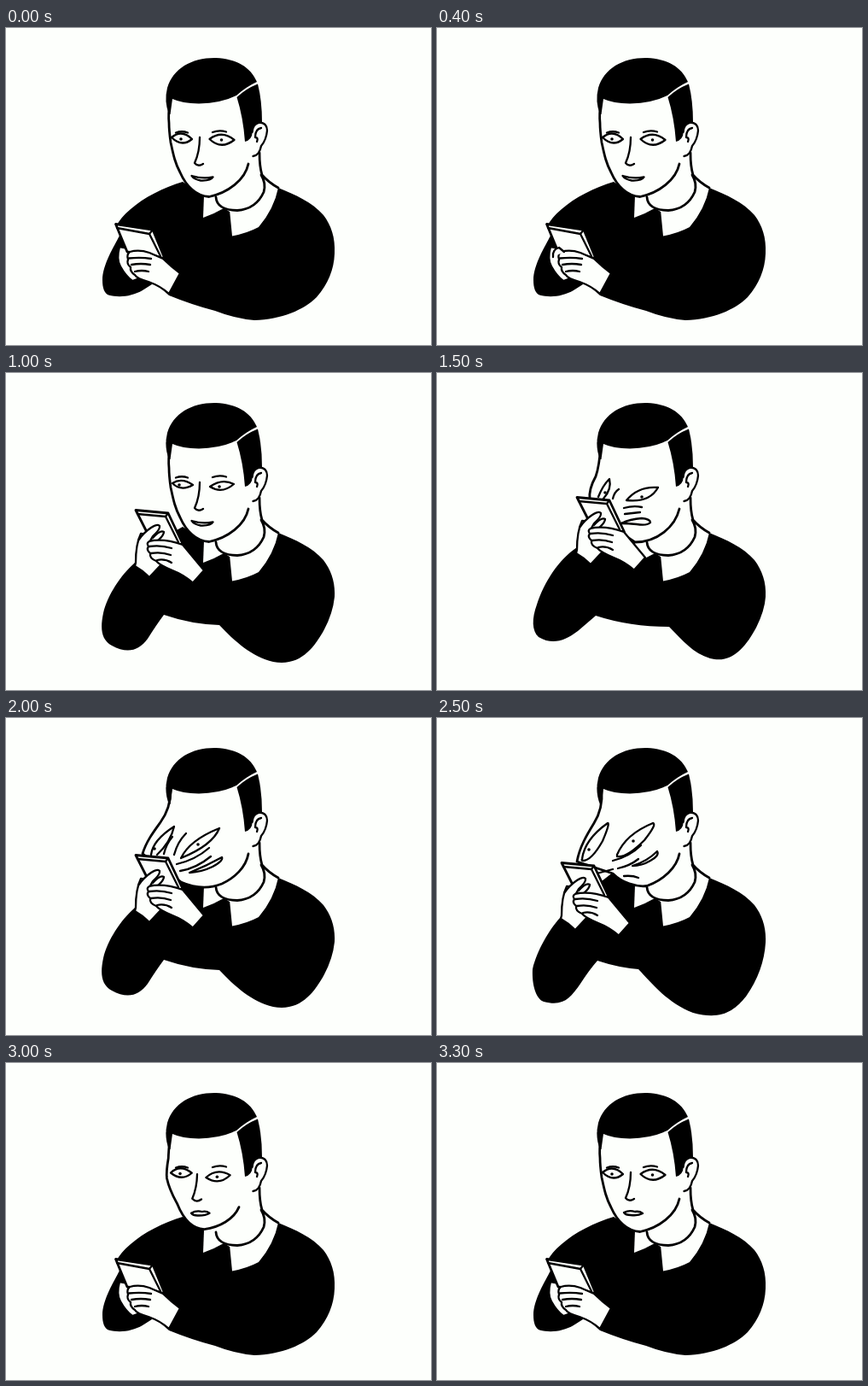
An HTML page that plays this animation: 498 px wide and 371 px high, repeating every 4.3 s.

```html
<!DOCTYPE html>
<html lang="en">
<head>
<meta charset="utf-8">
<title>Man with a phone</title>
<style>
  html, body { margin: 0; width: 100%; height: 100%; overflow: hidden; background: #fdfffc; }
  svg { display: block; width: 100vw; height: 100vh; }
  path { fill: none; stroke: #000; stroke-width: 2.3; stroke-linecap: round; stroke-linejoin: round; }
  .ink { fill: #000; stroke: none; }
  .skin { fill: #fdfffc; }
  .paper { fill: #fdfffc; stroke: none; }
  .bold { stroke-width: 2.8; }
</style>
</head>
<body>
<svg viewBox="0 0 498 371">
  <path id="body" class="ink"/>
  <path class="paper" d="M232 196 L231 222 Q243 218 255 211 L246 197Z"/>
  <path class="paper" d="M299 171 Q308 181 319 187 Q314 212 296 233 Q283 240 265 243.5 L262 213 Q290 212 300 198Z"/>
  <path class="paper" d="M246 196 Q248 213 271 214 Q300 210 304 182 L298 168 L284 158Z"/>
  <path class="bold" d="M246 198 Q247 213 271 213.5 Q293 212 302 192 Q305 182 299 172"/>
  <path class="bold" d="M297 146 Q297 162 300 172 Q308 181 319 187"/>
  <path id="face" class="skin bold"/>
  <path class="ink" d="M191 101 Q185 86 189 70 C196 47 218 34.5 246 35 C270 36 287 46 294 63 Q281 69 270 79 Q252 88 226 88.5 Q206 88 195 83 L192.500 101Z"/>
  <path class="ink" d="M295 65.500 Q300 85 300 110 Q291 112 289 122 Q288 131 280 133 Q278 105 270.500 81 Q281 71 295 65.500Z"/>
  <path class="skin" d="M288.500 122 Q289 112 297 110.500 Q306 111 306 120 Q305 131 299 138 Q297 149 289.500 150"/>
  <path d="M292 128 Q292 118 299 117 M292 128 Q296 128 294 133"/>
  <g id="features"></g>
  <g id="hands"></g>
</svg>
<script>
const $ = id => document.getElementById(id);
const path = (d, cls = '') => `<path class="${cls}" d="${d}"/>`;
const dot = ([x, y]) => `<circle cx="${x}" cy="${y}" r="1.8"/>`;
const mix = (a, b, k) => {
  const to = b.match(/-?[\d.]+/g);
  let i = 0;
  return a.replace(/-?[\d.]+/g, n => +n + (to[i++] - n) * k);
};

const shoulder = 'C386 245 381 231 372 219 C358 203 340 196 319 187 L262 215Z';
const bodies = {
  low: 'M207 180 C184 187 162 198 146 212 Q135 221 129 232 L133 243 C127 255 113 277 113 295 C113 304 115 310 120 312.500 C133 316 148 314 160 307 Q168 302 174 298 L191 313 Q218 324 245 331 Q268 340 291 342 C323 341 349 330 364 315 Q384 292 385 264 ' + shoulder,
  high: 'M207 180 L180 195 L164 204 C142 219 126 244 117 271 C111 287 111 302 119 309 C136 319 150 313 165 302 L186 284 Q226 297 272 297 C288 313 300 328 320 334 C346 341 362 320 374 298 Q384 278 385 262 ' + shoulder,
  mid: 'M207 180 L180 195 L151 222 C134 237 119 260 114 281 C110 300 112 312 124 319 C142 329 156 325 166 311 Q176 295 185 283 Q217 294 250 295 C268 314 288 332 313 338 C344 344 361 322 373 300 Q383 281 385 262 ' + shoulder,
  lower: 'M207 180 L175 205 L144 234 C132 247 117 272 112 294 C111 312 116 329 125 332 C148 338 156 328 168 311 Q179 294 188 284 Q212 292 236 294 C254 313 270 333 300 345 C333 354 348 343 362 326 Q383 296 385 263 ' + shoulder
};

const brows = 'M199 122.500 Q206 120 213 122.500 M242 122 Q250 119 258 121.500';
const calm = {
  face: 'M192 84 C191 93 190 103 191 111 C191 120 192 127 193 134 C196 148 198 158 204 169 C211 185 223 197 238 197.500 C260 193 280 178 284 159',
  eyes: 'M194 128 Q206 118 218 130 Q206 140 194 128Z M238.500 130 Q253 119 267.500 131 Q252 143 238.500 130Z',
  dots: [[205, 130], [252.5, 131]],
  lines: 'M227 128 Q227 145 221 158 Q225 163 231 159',
  mouth: 'M217.500 173 Q230 177 242.500 174.500 Q240 179 228 178.500 Q220 177 217.500 173Z'
};
const flat = { ...calm, mouth: 'M219 175 Q225 172 232 174 Q237 173 241 176 Q236 179 227 178 Q221 178 219 175Z' };
const peering = { ...calm,
  eyes: 'M195 129 Q206 122 219 131 Q205 139 195 129Z M239 133 Q253 123 267 130 Q253 142 239 133Z',
  dots: [[203, 131], [250, 133]] };
const pressed = {
  face: 'M192 84 C191 98 190 110 186 121 C181 130 178 140 179 148 L208 182 L232 198 C258 198 279 180 284 159',
  eyes: 'M189 145 Q194 132 202 124 Q205 136 195 147 M222 149 Q236 132 259 134 Q249 152 222 149Z',
  dots: [[197, 140], [240, 145]],
  lines: 'M213 136 Q208 139 206 147 M219 158 Q230 155 240 157 M220 165 L238 163',
  mouth: 'M216 176 Q226 171 240 170 Q250 171 250 175 Q246 179 234 177 Q224 176 216 176Z'
};
const stretched = {
  face: 'M193 84 C193 99 189 111 181 122 C173 133 164 145 160 159 L205 192 C221 199 238 200 253 194 C268 187 281 175 284 159',
  eyes: 'M170 160 Q172 143 197 127 Q193 145 177 160 M205 164 Q215 143 250 129 Q242 149 205 164Z',
  dots: [[174, 153], [225, 148]],
  lines: 'M185 159 Q188 147 195 139 M197 160 Q201 145 211 135 M200 171 Q222 166 238 152 M204 179 Q223 176 240 162',
  mouth: 'M215 181 Q235 173 253 163 Q255 167 242 174 Q230 180 215 181Z'
};
const sagging = {
  face: 'M193 84 C194 99 191 112 184 123 C176 136 167 151 164 168 L206 182 C217 193 233 198 246 196.500 C265 190 281 175 284 159',
  eyes: 'M170 165 Q173 142 200 123 Q203 123 194 144 Q181 167 171 167 Q169 167 170 165Z M211 160 Q221 136 253 123 Q258 124 243 143 Q222 164 211 162Z',
  dots: [[178, 154], [230, 144]],
  lines: 'M206 167 Q226 162 239 149 M212 176 Q226 173 236 165 M189 181.500 L206 177 M219 185 Q229 184 236 187',
  mouth: 'M229 173 Q246 168 258 156 Q261 161 250 167 Q240 173 229 173Z'
};
const lopsided = {
  face: 'M192 84 C193 95 192 106 188 113 C182 121 174 130 175 138 C177 148 187 145 191 153 C194 165 198 184 215 186 C222 190 228 197 240 197.500 C261 193 280 178 284 159',
  eyes: 'M190 130 Q199 118 217 125 Q206 136 190 130Z M222 146 Q230 132 248 132 Q242 147 222 146Z',
  dots: [[201, 128], [232, 140]],
  lines: 'M215 137 Q214 149 210 161 Q217 167 223 161',
  mouth: 'M211 178 Q217 173 223 174 Q227 172 231 175 Q226 178 219 180 Q215 181 211 178Z'
};

// k is the spring position: 0 lopsided, 1 calm.
const settling = k => ({
  ...flat,
  ...Object.fromEntries(['face', 'eyes', 'lines', 'mouth'].map(p => [p, mix(lopsided[p], flat[p], k)])),
  dots: flat.dots.map((p, i) => p.map((v, j) => lopsided.dots[i][j] + (v - lopsided.dots[i][j]) * k))
});

const phone = path('M128.500 229.500 L172 236 L186 270 L176 267 L142 262Z', 'skin bold') +
  path('M130 234 L168 241 L181 267 M168 241 L172 236');
const rightHand = path('M145 262 Q156 259 168 263 L184 270 Q193 279 204 287 L191 311 Q181 302 167 297 Q153 293 151 289 Q145 285 146 280 Q141 276 143 271 Q141 265 145 262Z', 'skin') +
  path('M144 269.500 Q158 268 170 270 M147 277 Q158 275 169 277 M151 285 Q159 283 167 285');

const lowHands = (left, right) =>
  path('M133 256 Q129 271 134 279 Q140 290 148 296 L165 290 L155 260Z', 'skin') + phone +
  rightHand +
  (left ? path(`M136 268 Q135 ${261 - left * 2} 143 ${258 - left} L149 262`, 'skin') : '') +
  (right ? path('M183 269 Q182 261 187 262 L194 272', 'skin') : '');

const grip = () =>
  phone +
  path('M133 250 Q127 280 132 293 Q139 304 146 307 Q147 292 155 283 L148 265 Q157 254 156 247 Q151 244 143 250 Q136 254 134 262', 'skin') +
  rightHand +
  path('M147 266 Q158 251 165 251 Q168 253 155 265 M158 264 Q169 255 172 258 Q172 261 164 265', 'skin');

const highHands = (x, y) => `<g transform="translate(${x} ${y})">` +
  path('M152 222 Q152 200 158 188 L178 190 L184 222 L168 239 Q160 231 151 226Z', 'skin') +
  path('M152 160.500 L190 164 L207.500 201 L170 196Z', 'skin bold') +
  path('M154 165 L187 168 L202 198 M187 168 L190 164') +
  path('M155 196 Q161 187 170 181 Q178 176 180 179 Q181 183 172 191 L168 198', 'skin') +
  path('M172 193 Q181 183 185 186 Q185 190 178 196', 'skin') +
  path('M168 197 Q184 193 207 201 L232 231 L219 245.500 Q208 236 195 231 Q180 225 176 220 Q168 217 169 211 Q164 207 167 203 Q164 199 168 197Z', 'skin') +
  path('M168 203 Q181 201 194 205 M170 211 Q182 209 193 213 M177 219 Q186 217 194 222') + '</g>';

// start time, face, body, hands, brows
const low = (t, face, left = 0, right = 0) => [t, face, bodies.low, lowHands(left, right), true];
const poses = [
  low(0, calm), low(200, calm, 0, 1), low(400, calm, 1, 0), low(600, calm, 2, 1), low(800, calm),
  [1000, peering, bodies.mid, highHands(0, 0), true],
  [1500, pressed, bodies.high, highHands(12, -15)],
  [2000, stretched, bodies.mid, highHands(0, 0)],
  [2500, sagging, bodies.lower, highHands(-6, 9)],
  [2700, lopsided, bodies.low, grip()],
  ...[1.2, 0.75, 1.1, 0.95].map((k, i) => low(2900 + i * 100, settling(k))),
  low(3300, flat)
];

let shown;
function frame(now) {
  const t = now % 4300;
  const pose = poses.findLast(p => p[0] <= t);
  if (pose !== shown) {
    shown = pose;
    const [, face, body, hands, browed] = pose;
    $('body').setAttribute('d', body);
    $('face').setAttribute('d', face.face);
    $('features').innerHTML = path(face.eyes) + face.dots.map(dot).join('') +
      path(face.lines) + path(face.mouth, 'skin') + (browed ? path(brows) : '');
    $('hands').innerHTML = hands;
  }
  requestAnimationFrame(frame);
}
frame(performance.now());
</script>
</body>
</html>
```
